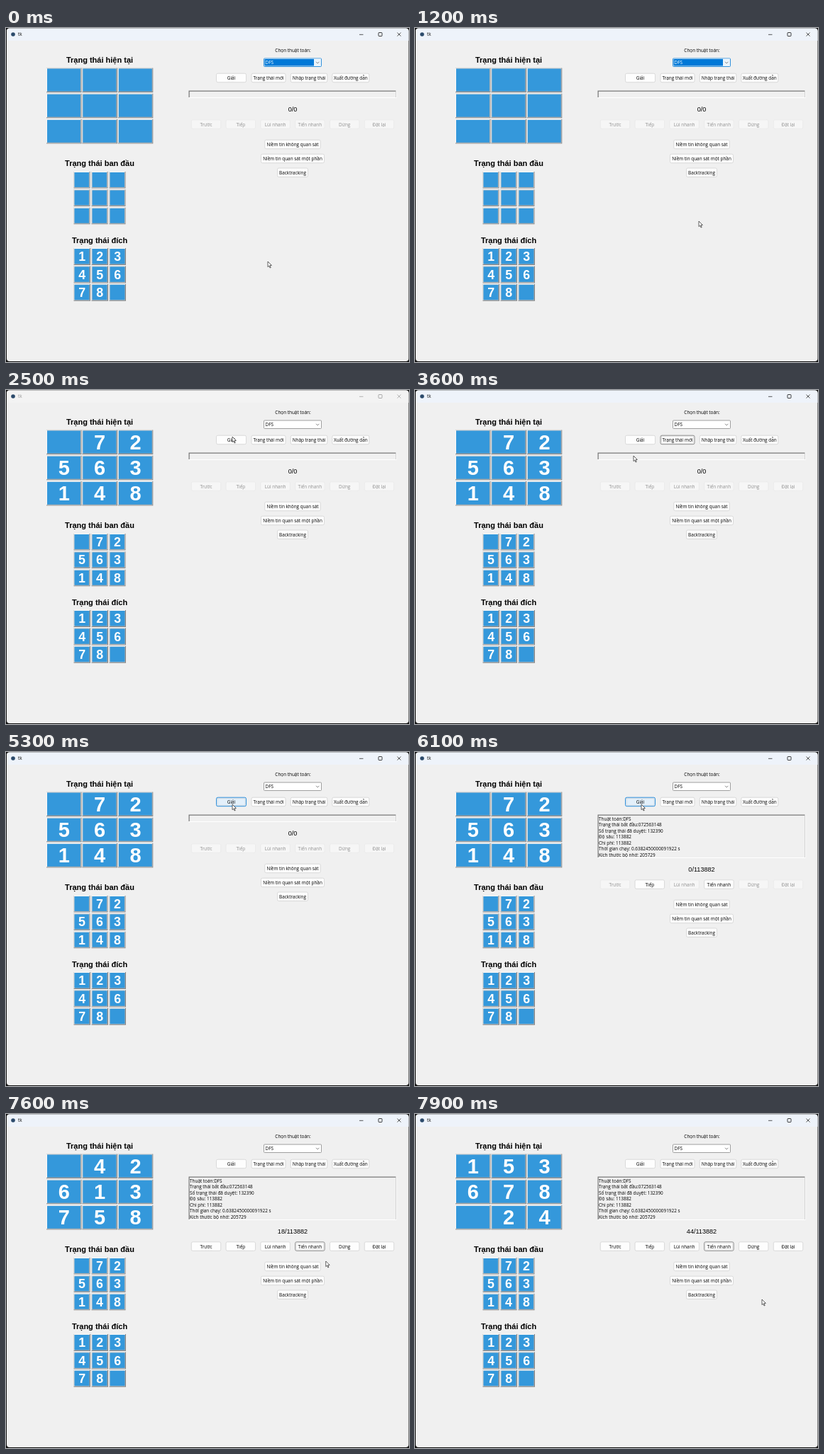
An HTML page with a canvas for the animation above (8000 ms loop, 568 by 472 pixels).

```html
<!DOCTYPE html>
<html lang="vi">
<head>
<meta charset="utf-8">
<title>tk</title>
<style>
  html, body { margin: 0; width: 100%; height: 100%; overflow: hidden; background: #000; }
  canvas { display: block; width: 568px; height: 472px; }
</style>
</head>
<body>
<canvas id="stage"></canvas>
<script>
const canvas = document.getElementById('stage');
const ctx = canvas.getContext('2d');
const ratio = window.devicePixelRatio || 1;
canvas.width = 568 * ratio;
canvas.height = 472 * ratio;

const LOOP = 8000, TICK = 100;
const UI = '6.4px "Open Sans", "Noto Sans", sans-serif';
const sans = (size, weight = '') => `${weight} ${size}px "Liberation Sans", Arial, sans-serif`;
const BLUE = '#0078d4', FACE = '#f0f0f0';

// Moments at which the interface changes
const NEW_CLICK = 2000, DIALOG_CLOSED = 3000, SOLVE_CLICK = 5000,
      SOLVED = 5400, PLAY = 7400, PLAY_END = 7900;

const START = '072563148', GOAL = '123456780', EMPTY = '000000000';
const PATH = 'DDRUUL'.repeat(4) + 'DDRUU' + 'RDDLUULDDRUULDD';
const SHIFT = { U: -3, D: 3, L: -1, R: 1 };

const REPORT = ['Thuật toán:DFS', 'Trạng thái bắt đầu:072563148', 'Số trạng thái đã duyệt: 132390',
  'Độ sâu: 113882', 'Chi phí: 113882', 'Thời gian chạy: 0.6382450000091922 s',
  'Kích thước bộ nhớ: 205729'];

// Pointer route: time, x, y
const ROUTE = [[0, 369, 330], [500, 378, 312], [1200, 400, 273], [1800, 375, 87], [1900, 369, 70],
  [2200, 366, 70], [2500, 319, 66], [2800, 300, 220], [3000, 298, 232], [3200, 300, 210],
  [3600, 308, 93], [4000, 307, 70], [5200, 307, 70], [5300, 319, 74], [6400, 319, 74],
  [7000, 462, 198], [7200, 459, 194], [7400, 436, 188], [7500, 438, 190], [7900, 489, 262], [8000, 489, 262]];

function pointerAt(t) {
  const i = ROUTE.findIndex(p => p[0] > t);
  const [a, b] = [ROUTE[i - 1], ROUTE[i]];
  const k = (t - a[0]) / (b[0] - a[0]);
  return { x: a[1] + (b[1] - a[1]) * k, y: a[2] + (b[2] - a[2]) * k };
}

function boardAfter(steps) {
  const cells = [...START];
  let blank = 0;
  for (const move of PATH.slice(0, steps)) {
    const next = blank + SHIFT[move];
    [cells[blank], cells[next]] = [cells[next], '0'];
    blank = next;
  }
  return cells.join('');
}

function rect(x, y, w, h, color) {
  ctx.fillStyle = color;
  ctx.fillRect(x, y, w, h);
}

function text(str, x, y, font = UI, color = '#000', align = 'center') {
  ctx.font = font;
  ctx.fillStyle = color;
  ctx.textAlign = align;
  ctx.fillText(str, x, y);
}

function stroke(points, color, width = 0.7) {
  ctx.beginPath();
  points.forEach(([x, y]) => ctx.lineTo(x, y));
  ctx.strokeStyle = color;
  ctx.lineWidth = width;
  ctx.stroke();
}

function box(x, y, w, h, radius, fill, border, width = 0.8) {
  ctx.beginPath();
  ctx.roundRect(x, y, w, h, radius);
  ctx.fillStyle = fill;
  ctx.fill();
  ctx.strokeStyle = border;
  ctx.lineWidth = width;
  ctx.stroke();
}

function board(title, titleY, cells, x, y, w, h, dx, dy, size) {
  text(title, 132, titleY, sans(11, 'bold'));
  [...cells].forEach((digit, i) => {
    const left = x + (i % 3) * dx, top = y + Math.floor(i / 3) * dy;
    rect(left, top, w, h, '#858585');
    rect(left, top, w - 1, h - 1, '#f8f8f8');
    rect(left + 1, top + 1, w - 2, h - 2, '#a0a8ae');
    rect(left + 1, top + 1, w - 2.6, h - 2.6, '#3498db');
    if (digit !== '0') text(digit, left + w / 2, top + h / 2 + size * 0.35, sans(size, 'bold'), '#fff');
  });
}

function button(label, cx, y, w, ui, enabled = true) {
  const x = cx - w / 2, h = 12.5, { x: px, y: py } = ui.pointer;
  const hover = ui.active && enabled && px >= x && px <= x + w && py >= y && py <= y + h;
  const focused = ui.active && ui.focus === label;
  const border = hover ? BLUE : focused ? '#707070' : enabled ? '#d2d2d2' : '#e9e9e9';
  box(x, y, w, h, 2, hover ? '#e3f0fb' : enabled ? '#fdfdfd' : '#f6f6f6', border);
  if (focused) {
    ctx.setLineDash([1, 1]);
    box(x + 1.5, y + 1.5, w - 3, h - 3, 0, 'transparent', '#999', 0.5);
    ctx.setLineDash([]);
  }
  text(label, cx, y + 8.7, UI, enabled ? '#000' : '#8f8f8f');
}

function windowFrame(active) {
  rect(0, 0, 568, 472, '#111');
  ctx.beginPath();
  ctx.roundRect(1, 0.5, 566.5, 470.5, 4);
  ctx.fillStyle = FACE;
  ctx.fill();
  ctx.save();
  ctx.clip();
  rect(0, 0, 568, 18, active ? '#eef3fa' : '#f3f3f3');
  ctx.restore();
  const ink = active ? '#111' : '#999';
  ctx.beginPath();
  ctx.arc(10, 9, 2.8, 0, 7);
  ctx.fillStyle = '#2b4a6b';
  ctx.fill();
  text('tk', 17, 11.3, UI, ink, 'left');
  stroke([[498, 9.3], [503.5, 9.3]], ink);
  box(525, 6.5, 5, 5, 0.8, 'transparent', ink, 0.8);
  stroke([[551.5, 6.5], [556.5, 11.5]], ink);
  stroke([[556.5, 6.5], [551.5, 11.5]], ink);
}

function combo(focused) {
  box(363.5, 43, 81, 11.5, 1, '#fff', focused ? BLUE : '#8a8a8a');
  if (focused) {
    rect(364.5, 44, 69.5, 9.5, '#0078d7');
    rect(434, 43.5, 10, 10.5, '#eaf4fc');
  }
  text('DFS', 365.5, 51.2, UI, focused ? '#fff' : '#000', 'left');
  stroke([[437, 47.8], [439.2, 50], [441.4, 47.8]], '#555');
}

function report(solved) {
  const height = solved ? 61.5 : 10.5;
  rect(257.5, 88.5, 293, height, '#fff');
  rect(257.5, 88.5, 292, height - 1, '#707070');
  rect(258.7, 89.7, 290.8, height - 2.2, FACE);
  if (solved) REPORT.forEach((line, i) => text(line, 259, 96.5 + i * 8.5, UI, '#000', 'left'));
}

function cursor({ x, y }) {
  ctx.beginPath();
  [[0, 0], [0, 7.6], [1.8, 6], [3, 9], [4.2, 8.5], [3, 5.6], [5.4, 5.4]]
    .forEach(([dx, dy]) => ctx.lineTo(x + dx, y + dy));
  ctx.closePath();
  ctx.fillStyle = '#fff';
  ctx.fill();
  ctx.strokeStyle = '#222';
  ctx.lineWidth = 0.7;
  ctx.stroke();
}

function draw(t) {
  const created = t >= NEW_CLICK, solved = t >= SOLVED;
  const progress = Math.min(1, Math.max(0, (t - PLAY) / (PLAY_END - PLAY)));
  const steps = Math.round(progress * PATH.length);
  const ui = {
    pointer: pointerAt(t),
    active: t < NEW_CLICK || t >= DIALOG_CLOSED,
    focus: t < NEW_CLICK ? 'combo' : t < SOLVE_CLICK ? 'Trạng thái mới' : t < PLAY ? 'Giải' : 'Tiến nhanh'
  };

  ctx.setTransform(ratio, 0, 0, ratio, 0, 0);
  windowFrame(ui.active);

  board('Trạng thái hiện tại', 49, created ? boardAfter(steps) : EMPTY, 57, 56.5, 49.5, 34.5, 50.4, 36.2, 29);
  board('Trạng thái ban đầu', 195, created ? START : EMPTY, 95.5, 203, 23, 23.5, 25, 25.4, 17.8);
  board('Trạng thái đích', 303.5, GOAL, 95.5, 311, 23.5, 24, 25, 25.4, 17.8);

  text('Chọn thuật toán:', 404.5, 34, UI);
  combo(ui.focus === 'combo');
  button('Giải', 317.5, 64.2, 42, ui);
  button('Trạng thái mới', 370, 64.2, 48, ui);
  button('Nhập trạng thái', 427, 64.2, 51.5, ui);
  button('Xuất đường dẫn', 485.8, 64.2, 52, ui);

  report(solved);
  const drop = solved ? 51 : 0, playing = t >= PLAY;
  text(solved ? `${steps}/113882` : '0/0', 404, 117.5 + drop, sans(9.1));
  ['Trước', 'Tiếp', 'Lùi nhanh', 'Tiến nhanh', 'Dừng', 'Đặt lại'].forEach((label, i) =>
    button(label, 282 + i * 48.8, 129.8 + drop, 41.5, ui, playing || solved && (i === 1 || i === 3)));
  button('Niềm tin không quan sát', 404, 158.2 + drop, 78.5, ui);
  button('Niềm tin quan sát một phần', 404, 178.2 + drop, 89, ui);
  button('Backtracking', 404, 198 + drop, 43, ui);

  cursor(ui.pointer);
}

const origin = performance.now();
function frame() {
  const t = (performance.now() - origin) % LOOP;
  draw(Math.floor(t / TICK) * TICK);
  requestAnimationFrame(frame);
}
frame();
</script>
</body>
</html>
```
